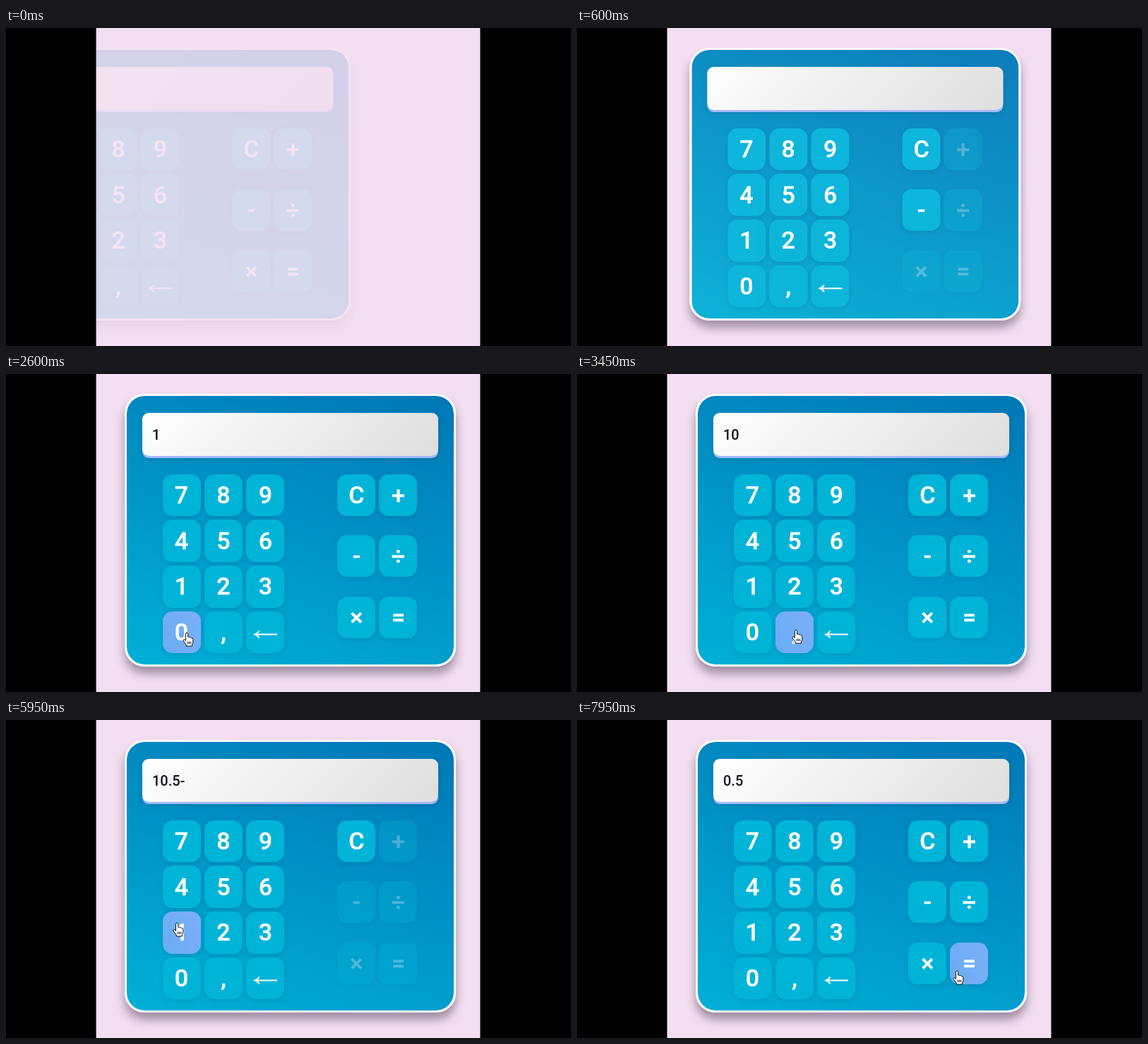
Recreate the animation shown at these times as an HTML page. Size 800 by 450 pixels, loop 8000 ms.

```html
<!DOCTYPE html>
<html lang="en">
<head>
<meta charset="utf-8">
<title>Calculator</title>
<style>
  html, body { margin: 0; width: 100%; height: 100%; overflow: hidden; background: #000; }
  #scene { position: absolute; left: 0; top: 0; width: 800px; height: 450px; background: #f4dff2;
    clip-path: inset(0 128.6px 0 127.6px); font-family: Roboto, sans-serif; }
  #calculator { position: absolute; inset: 0; }
  #card { position: absolute; left: 168px; top: 28px; width: 463px; height: 380px;
    border: 3px solid #fcfaff; border-radius: 28px;
    background: linear-gradient(20deg, #00b0d6, #0077b6) padding-box;
    box-shadow: 0 10px 14px rgba(30, 15, 40, .4); }
  #display { position: absolute; left: 193px; top: 55px; width: 405px; height: 61px; padding-left: 14px;
    border-radius: 9px; background: linear-gradient(135deg, #fff, #dedede);
    box-shadow: 0 3px #a3b8fb, 0 4px 8px rgba(0, 0, 0, .15);
    font-size: 20px; font-weight: 500; line-height: 62px; color: #10101c; }
  .key { position: absolute; width: 54px; border-radius: 14px; background: #00b4d8;
    box-shadow: 0 2px 6px rgba(0, 40, 80, .13);
    display: flex; align-items: center; justify-content: center;
    color: #fff; font-size: 34px; font-weight: 500; -webkit-text-stroke: .4px #fff; }
  .key::before { content: ""; position: absolute; inset: 0; border-radius: inherit;
    background: linear-gradient(60deg, #69acf2, #7caff9); opacity: var(--hover, 0); }
  .key span { position: relative; top: -.5px; }
  .key svg { position: absolute; left: 0; top: 0; }
  #cursor { position: absolute; left: 0; top: 0; overflow: visible; }
  #cursor path { fill: #fff; stroke: #111; stroke-width: 1; stroke-linejoin: round; }
</style>
</head>
<body>
<div id="scene">
  <div id="calculator">
    <div id="card"></div>
    <div id="display"></div>
  </div>
  <svg id="cursor" width="20" height="22">
    <path id="arrow" d="M0 0V14.5L3.3 11.5L5.6 17L8 16L5.7 10.6H10Z"/>
    <g id="hand">
      <path d="M-1.6 1.3Q-1.4 .2 0 .2T1.6 1.5V6.2Q3.4 5.2 4 6.8Q6 6 6.4 7.6Q8.8 7 8.8 9.5V13Q8.8 15 7.5 16.5V19H-.8V17L-4.4 12.2Q-5.6 10.2-4.3 9.6Q-3.4 9.2-1.6 11.3Z"/>
      <path d="M1.4 12.5V16M3.5 12.5V16M5.6 12.5V16" fill="none"/>
    </g>
  </svg>
</div>
<script>
const LOOP = 8000;
const $ = id => document.getElementById(id);
const calculator = $('calculator');
const smooth = p => p * p * (3 - 2 * p);

const keys = [];
function addKey(label, x, y, height) {
  const el = document.createElement('div');
  el.className = 'key';
  el.style.cssText = `left:${x}px;top:${y}px;height:${height}px`;
  el.innerHTML = label === '←'
    ? '<svg width="54" height="60"><path d="M44 32.5H13M18.5 27.5Q16.5 31 12.5 32.5Q16.5 34 18.5 37.5" fill="none" stroke="#fff" stroke-width="2"/></svg>'
    : `<span>${label}</span>`;
  calculator.append(el);
  keys.push({ el, label, x, y, height });
}
[...'7894561230,←'].forEach((label, i) =>
  addKey(label, 221.5 + 59.4 * (i % 3), 141.8 + 64.6 * Math.floor(i / 3), 59.5));
[...'C+-÷×='].forEach((label, i) =>
  addKey(label, 469.3 + 59.1 * (i % 2), 141.8 + 86.4 * Math.floor(i / 2), 59.3));

// Display contents: [time, text]
const entries = [[0, ''], [1920, '1'], [2750, '10'], [3500, '10.'], [4150, '10.5'],
  [5130, '10.5-'], [6120, '10.5-1'], [6750, '10.5-10'], [7800, '0.5']];
const textAt = t => entries.findLast(e => e[0] <= t)[1];

// Pointer stops: [time, x, y]
const stops = [[1000, 120, 172], [1750, 248, 302], [2050, 248, 302], [2450, 256, 366],
  [2850, 256, 366], [3250, 310, 362], [3600, 310, 362], [3950, 314, 236.5],
  [4300, 314, 236.5], [4900, 497, 258], [5250, 497, 258], [5850, 242, 287],
  [6220, 242, 287], [6550, 251, 362], [6900, 251, 362], [7600, 538, 355], [8000, 538, 355]];

function pointerAt(t) {
  if (t < stops[0][0]) return [-50, -50];
  const i = stops.findIndex(s => s[0] > t);
  const [t0, x0, y0] = stops[i - 1], [t1, x1, y1] = stops[i];
  const p = smooth((t - t0) / (t1 - t0));
  return [x0 + (x1 - x0) * p, y0 + (y1 - y0) * p];
}

function isOver(key, [x, y]) {
  return x >= key.x && x <= key.x + 54 && y >= key.y && y <= key.y + key.height;
}

function isEnabled(label, t) {
  if (t < 0) return true;
  const text = textAt(t);
  if (label === ',') return !text.endsWith('.');
  if (label === '-' && !text) return true;
  return !'+-÷×='.includes(label) || /\d$/.test(text);
}

// Averaging a switch over a window turns each change into a timed fade.
function fade(state, t, duration) {
  const samples = 20;
  let sum = 0;
  for (let i = 0; i < samples; i++) sum += state(t - i * duration / samples);
  return smooth(sum / samples);
}

// CSS "ease": cubic-bezier(.25, .1, .25, 1)
function ease(p) {
  let low = 0, high = 1;
  const bezier = (a, b, u) => 3 * a * u * (1 - u) ** 2 + 3 * b * u * u * (1 - u) + u ** 3;
  for (let i = 0; i < 24; i++) {
    const mid = (low + high) / 2;
    if (bezier(.25, .25, mid) < p) low = mid; else high = mid;
  }
  return bezier(.1, 1, low);
}

function draw(t) {
  const entry = ease(Math.min(1, .12 + t / 1000));
  calculator.style.opacity = entry;
  calculator.style.transform = `translateX(${-171 * (1 - entry)}px)`;
  $('display').textContent = textAt(t);

  const pointer = pointerAt(t);
  for (const key of keys) {
    const enabled = fade(time => isEnabled(key.label, time), t, 300);
    const hover = fade(time => isOver(key, pointerAt(time)), t, 200);
    key.el.style.opacity = .3 + .7 * enabled;
    key.el.style.setProperty('--hover', hover);
  }

  const onKey = keys.some(key => isOver(key, pointer) && isEnabled(key.label, t));
  $('hand').style.display = onKey ? '' : 'none';
  $('arrow').style.display = onKey ? 'none' : '';
  $('cursor').style.transform = `translate(${pointer[0]}px, ${pointer[1]}px)`;
}

const start = performance.now();
function tick() {
  draw((performance.now() - start) % LOOP);
  requestAnimationFrame(tick);
}
tick();
</script>
</body>
</html>
```
